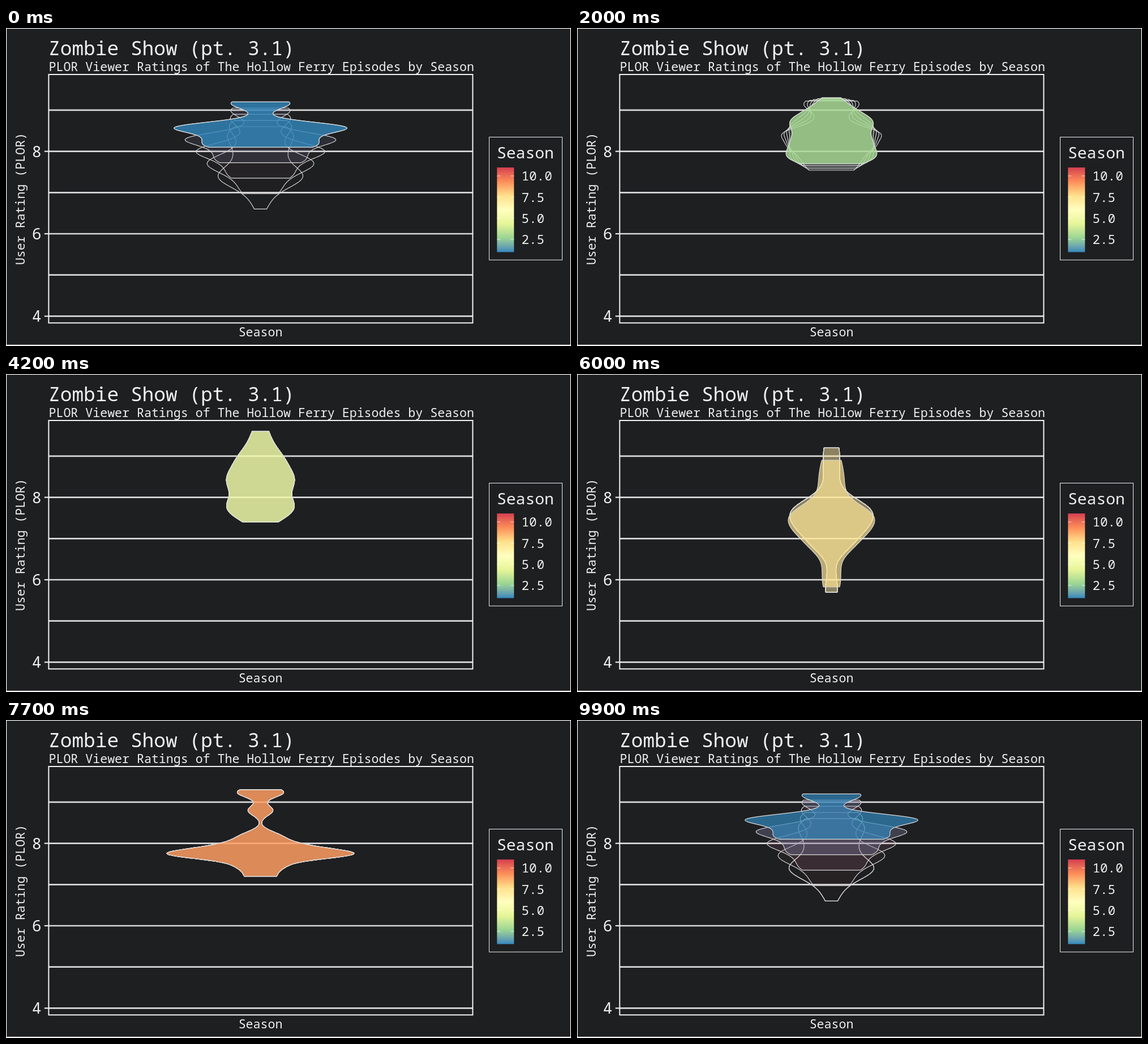
Write an HTML page that moves like this. It is 998 px wide and 561 px high and loops after 10000 ms.

```html
<!DOCTYPE html>
<html lang="en">
<head>
<meta charset="utf-8">
<title>Zombie Show</title>
<style>
  html, body { margin: 0; width: 100%; height: 100%; overflow: hidden; background: #fff; }
  svg { display: block; }
  text { font-family: "Noto Sans Mono", "DejaVu Sans Mono", monospace; fill: #f0f0f0; }
  .box { fill: none; stroke: #f2f2f2; }
  .grid { stroke: #d9d9d9; stroke-width: 2.7; }
  .tick { stroke: #ebebeb; stroke-width: 2.2; }
  .mark { stroke: #fff; stroke-width: 1; opacity: .7; }
  #violins path { stroke: #d9d9d9; stroke-width: 1.15; stroke-linejoin: round; }
  .mid { text-anchor: middle; }
  .end { text-anchor: end; }
</style>
</head>
<body>
<svg width="998" height="561" viewBox="0 0 998 561">
  <defs><linearGradient id="ramp" x1="0" y1="1" x2="0" y2="0"></linearGradient></defs>
  <rect x="1.2" y="1.2" width="995.6" height="557.6" fill="#1e1f21"/>
  <g id="axis"></g>
  <g id="violins"></g>
  <rect class="box" x="75.4" y="82" width="749" height="438.3" stroke-width="2"/>
  <text x="75" y="48" font-size="34.5">Zombie Show (pt. 3.1)</text>
  <text x="75.5" y="76" font-size="21.6">PLOR Viewer Ratings of The Hollow Ferry Episodes by Season</text>
  <text class="mid" x="449.5" y="543.5" font-size="21.6">Season</text>
  <text class="mid" transform="translate(33 301.5) rotate(-90)" font-size="21.6">User Rating (PLOR)</text>
  <rect class="box" x="853.5" y="192.5" width="129" height="216.7"/>
  <text x="867" y="230" font-size="28">Season</text>
  <rect x="867.3" y="246" width="30" height="149.4" fill="url(#ramp)"/>
  <g id="legend"></g>
</svg>
<script>
const STEP = 100, FRAMES = 100, WAKE = 5, ALPHA = 0.7, POINTS = 160, CENTER = 449.5;
const PALETTE = ["#3288bd", "#99d594", "#e6f598", "#ffffbf", "#fee08b", "#fc8d59", "#d53e4f"];

// Lowest rating, highest rating, bandwidth, then centre and half width of each density bump
const SEASONS = [
  [8.1, 9.2, 0.13, 8.11, 78, 8.33, 66, 8.585, 141, 8.9, 9, 9.17, 51],
  [7.5, 9.2, 0.17, 7.46, 26, 7.76, 32, 8.08, 62, 8.41, 80, 8.86, 14, 9.16, 52],
  [7.7, 9.3, 0.22, 7.85, 68, 8.27, 54, 8.72, 62, 9.11, 22],
  [7.6, 9.4, 0.25, 7.88, 54, 8.18, 66, 8.85, 32],
  [7.4, 9.6, 0.3, 7.72, 55, 8.4, 50, 8.95, 32, 9.55, 12],
  [7.5, 9.6, 0.26, 7.75, 30, 8.33, 82, 9, 20],
  [5.7, 9.2, 0.27, 5.7, 9, 6.15, 5, 6.85, 26, 7.3, 44, 7.72, 53, 8.2, 10, 8.72, 11, 9.22, 11],
  [6.2, 8, 0.3, 6.45, 37, 7.12, 78, 7.76, 38],
  [7.2, 9.3, 0.125, 7.18, 24, 7.45, 36, 7.74, 150, 7.95, 49, 8.18, 30, 8.8, 22, 9.24, 41],
  [4.1, 9.2, 0.35, 4.1, 7, 5.4, 6, 6.5, 9, 7, 27, 7.6, 56, 8.2, 23, 9.05, 13],
  [6.6, 8.6, 0.27, 6.8, 13, 7.38, 70, 7.95, 32, 8.45, 51]
];
// Frames each season rests, and frames it takes to become the next one
const stay = s => s % 6 ? 5 : 4;
const move = s => s < 2 ? 5 : 4;

const svgEl = (parent, name, attrs, text = "") => {
  const el = document.createElementNS("http://www.w3.org/2000/svg", name);
  for (const key in attrs) el.setAttribute(key, attrs[key]);
  el.textContent = text;
  return parent.appendChild(el);
};
const byId = id => document.getElementById(id);
const mix = (a, b, t) => a + (b - a) * t;
const mixAll = (a, b, t) => a.map((v, i) => mix(v, b[i], t));
const ratingY = r => 217.6 + (8 - r) * 72.7;

// Colours are blended in CIE Lab
const WHITE = [0.9505, 1, 1.089];
function toLab(hex) {
  const [r, g, b] = [1, 3, 5].map(i => {
    const c = parseInt(hex.slice(i, i + 2), 16) / 255;
    return c <= 0.04045 ? c / 12.92 : ((c + 0.055) / 1.055) ** 2.4;
  });
  const [x, y, z] = [
    0.4124 * r + 0.3576 * g + 0.1805 * b,
    0.2126 * r + 0.7152 * g + 0.0722 * b,
    0.0193 * r + 0.1192 * g + 0.9505 * b
  ].map((v, i) => {
    v /= WHITE[i];
    return v > 0.008856 ? Math.cbrt(v) : 7.787 * v + 16 / 116;
  });
  return [116 * y - 16, 500 * (x - y), 200 * (y - z)];
}
function toRgb([l, a, b]) {
  const fy = (l + 16) / 116;
  const [x, y, z] = [fy + a / 500, fy, fy - b / 200].map((f, i) =>
    WHITE[i] * (f ** 3 > 0.008856 ? f ** 3 : (f - 16 / 116) / 7.787));
  const rgb = [
    3.2406 * x - 1.5372 * y - 0.4986 * z,
    -0.9689 * x + 1.8758 * y + 0.0415 * z,
    0.0557 * x - 0.204 * y + 1.057 * z
  ].map(c => {
    c = Math.min(1, Math.max(0, c));
    return Math.round(255 * (c <= 0.0031308 ? 12.92 * c : 1.055 * c ** (1 / 2.4) - 0.055));
  });
  return `rgb(${rgb})`;
}
const labStops = PALETTE.map(toLab);
function paletteLab(t) {
  const p = t * (labStops.length - 1), i = Math.min(Math.floor(p), labStops.length - 2);
  return mixAll(labStops[i], labStops[i + 1], p - i);
}

function density(rating, bandwidth, bumps) {
  let sum = 0;
  for (let i = 0; i < bumps.length; i += 2) {
    sum += bumps[i + 1] * Math.exp(-(((rating - bumps[i]) / bandwidth) ** 2) / 2);
  }
  return sum;
}

const shapes = SEASONS.map(([lo, hi, bandwidth, ...bumps], s) => ({
  range: [lo, hi],
  widths: Array.from({ length: POINTS + 1 }, (_, i) => density(mix(lo, hi, i / POINTS), bandwidth, bumps)),
  lab: paletteLab(s / (SEASONS.length - 1))
}));

function pose(frame) {
  let left = frame;
  for (let s = 0; s < shapes.length; s++) {
    if (left <= stay(s)) return [s, 0];
    left -= stay(s);
    if (left < move(s)) return [s, left / move(s)];
    left -= move(s);
  }
  return [0, 0];
}

function drawViolin(path, frame) {
  const [s, t] = pose(frame);
  const from = shapes[s], to = shapes[(s + 1) % shapes.length];
  const [lo, hi] = mixAll(from.range, to.range, t);
  const widths = mixAll(from.widths, to.widths, t);
  const edge = side => widths.map((w, i) =>
    (CENTER + side * w).toFixed(2) + " " + ratingY(mix(lo, hi, i / POINTS)).toFixed(2));
  path.setAttribute("d", "M" + edge(-1).concat(edge(1).reverse()).join("L") + "Z");
  path.setAttribute("fill", toRgb(mixAll(from.lab, to.lab, t)));
}

for (let r = 4; r <= 9; r++) {
  const y = ratingY(r);
  svgEl(byId("axis"), "path", { class: "grid", d: `M75.4 ${y}H824.4` });
  if (r % 2 === 0) {
    svgEl(byId("axis"), "path", { class: "tick", d: `M67.8 ${y}H75.4` });
    svgEl(byId("axis"), "text", { class: "end", x: 62.5, y: y + 10, "font-size": 27.5 }, r);
  }
}
for (let v = 2.5; v <= 10; v += 2.5) {
  const y = 395.4 - (v - 1) / 10 * 149.4;
  svgEl(byId("legend"), "path", { class: "mark", d: `M867.3 ${y}h6M891.3 ${y}h6` });
  svgEl(byId("legend"), "text", { x: 910.5, y: y + 8.5, "font-size": 22.6 }, v.toFixed(1));
}
for (let i = 0; i <= 24; i++) {
  svgEl(byId("ramp"), "stop", { offset: i / 24, "stop-color": toRgb(paletteLab(i / 24)) });
}

// Oldest trail first, so the current violin lies on top
const paths = Array.from({ length: WAKE + 1 }, (_, i) =>
  svgEl(byId("violins"), "path", { "fill-opacity": ALPHA * (i / WAKE) ** 3 }));

let shown = -1;
function tick() {
  const frame = Math.floor(performance.now() / STEP) % FRAMES;
  if (frame !== shown) {
    shown = frame;
    paths.forEach((path, i) => drawViolin(path, (frame - WAKE + i + FRAMES) % FRAMES));
  }
  requestAnimationFrame(tick);
}
tick();
</script>
</body>
</html>
```
